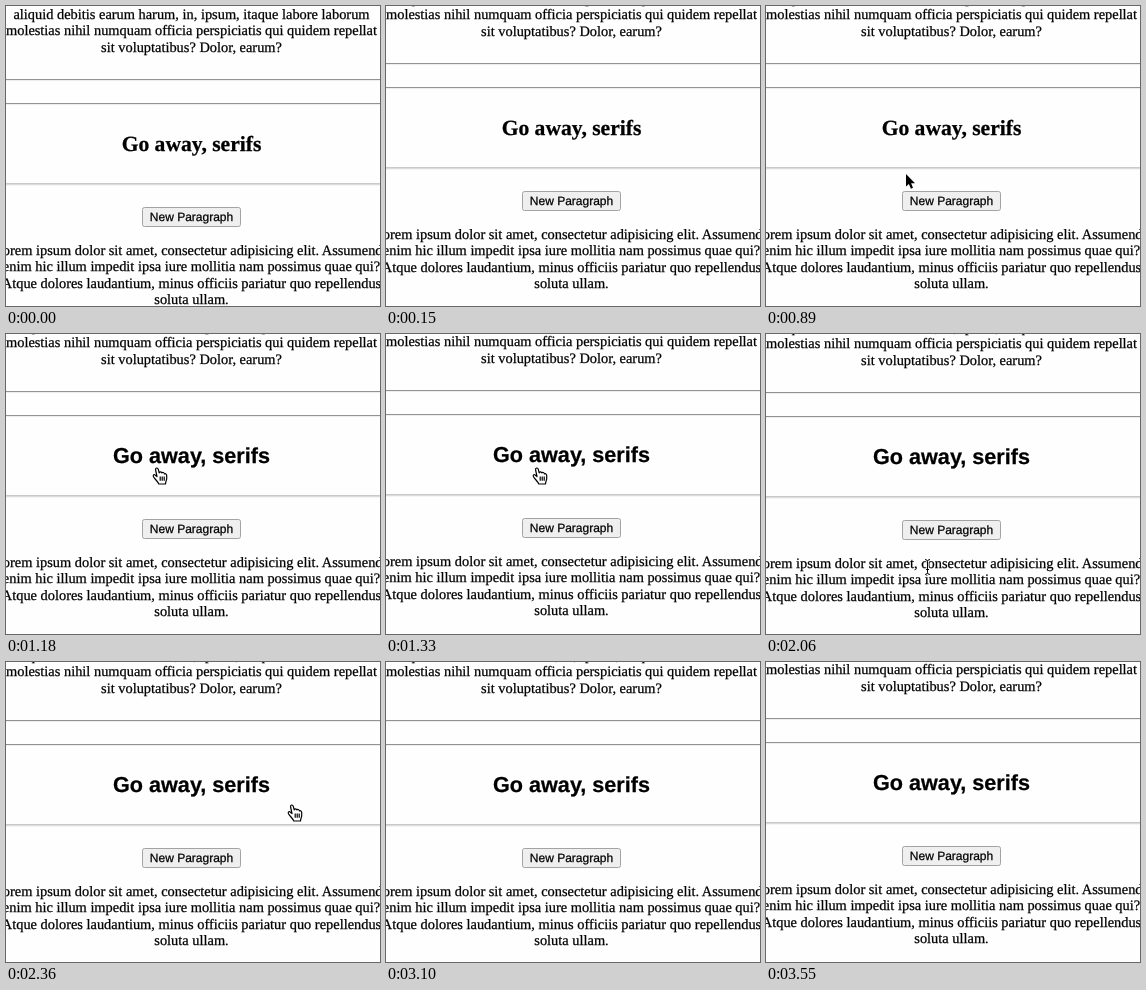
An HTML page for the animation above (3650 ms loop, 374 by 300 pixels).

```html
<!DOCTYPE html>
<html lang="en">
<head>
<meta charset="utf-8">
<title>Go away, serifs</title>
<style>
  html, body { margin: 0; width: 100%; height: 100%; overflow: hidden; background: #fefefe; }
  svg { display: block; width: 374px; height: 300px; }
  text { font: 14.4px "Liberation Serif", Times, serif; text-anchor: middle; text-rendering: geometricPrecision; stroke: #000; stroke-width: .25px; }
  #title { font-size: 21.6px; font-weight: bold; }
  #title.sans, #label { font-family: "Liberation Sans", Arial, sans-serif; }
  #label { font-size: 12px; }
  #pointer > * { visibility: hidden; }
  #pointer > .on { visibility: visible; }
</style>
</head>
<body>
<svg viewBox="0 0 374 300">
  <defs>
    <path id="stem" fill="none" d="M1 .5Q3.5 .5 3.5 2.5V13.5Q3.5 15.5 1 15.5M6 .5Q3.5 .5 3.5 2.5M3.5 13.5Q3.5 15.5 6 15.5M2 10.5H5"/>
  </defs>
  <g id="page">
    <text x="185.5" y="13">aliquid debitis earum harum, in, ipsum, itaque labore laborum</text>
    <text x="185.5" y="29">molestias nihil numquam officia perspiciatis qui quidem repellat</text>
    <text x="185.5" y="46">sit voluptatibus? Dolor, earum?</text>
    <path d="M0 73.5H374M0 97.5H374M0 178H374" stroke="#929292"/>
    <path d="M0 74.5H374M0 98.5H374M0 179H374" stroke="#eee"/>
    <text id="title" x="185.5" y="145">Go away, serifs</text>
    <rect x="136.5" y="201.5" width="98" height="19" rx="2" fill="#efefef" stroke="#a3a3a3"/>
    <text id="label" x="185.5" y="215">New Paragraph</text>
    <text x="185.5" y="249">Lorem ipsum dolor sit amet, consectetur adipisicing elit. Assumenda</text>
    <text x="185.5" y="265">enim hic illum impedit ipsa iure mollitia nam possimus quae qui?</text>
    <text x="185.5" y="282">Atque dolores laudantium, minus officiis pariatur quo repellendus</text>
    <text x="185.5" y="298">soluta ullam.</text>
  </g>
  <g id="pointer">
    <path id="arrow" d="M2 1V13.6L4.9 11 6.9 15.7 9 14.8 7.1 10.2H11Z" stroke="#fff" stroke-width="2" paint-order="stroke"/>
    <g id="beam">
      <use href="#stem" stroke="#fff" stroke-width="2.4"/>
      <use href="#stem" stroke="#000"/>
    </g>
    <path id="hand" fill="#fff" stroke="#000" stroke-width="1.2" stroke-linejoin="round" d="M5 9.5 3.6 3C3.2 .7 5.7 .3 6.3 2.3L7.2 5.8C7.6 4.4 9.5 4.5 9.8 6 10.5 5 12.2 5.4 12.4 6.9 13.4 6.3 14.7 7 14.7 8.6V11.5C14.7 13.2 13.7 14.2 13.5 17H6.8C5.8 14.5 3.2 12.4 1.6 10 .5 8.2 2 6.8 3.4 8.2ZM8.2 9.5V13.8M10.2 9.5V13.8M12.2 9.5V13.8"/>
  </g>
</svg>
<script>
const LOOP = 3650;
const $ = id => document.getElementById(id);

// [start ms, page offset]
const scroll = [[0, 0], [150, -16], [1330, -17], [2060, -15], [3550, -17]];

// [start ms, cursor, left, top]
const moves = [
  [0, '', 0, 0],
  [590, 'beam', 142, 296], [740, 'beam', 137, 206],
  [890, 'arrow', 138, 167],
  [1040, 'hand', 139, 147], [1180, 'hand', 146, 133], [1470, 'hand', 144, 139],
  [1620, 'beam', 158, 217], [1770, 'beam', 157, 224], [1920, 'beam', 158, 224], [2060, 'beam', 158, 225],
  [2210, 'arrow', 230, 209],
  [2360, 'hand', 281, 142], [2510, 'hand', 260, 126], [2660, 'hand', 235, 118],
  [2800, 'hand', 231, 117], [2950, 'hand', 258, 171],
  [3100, '', 0, 0]
];

const current = (steps, t) => steps.findLast(step => step[0] <= t);

function draw(now) {
  const t = now % LOOP;
  const [, cursor, x, y] = current(moves, t);
  $('page').setAttribute('transform', `translate(0 ${current(scroll, t)[1]})`);
  $('title').classList.toggle('sans', t >= 1040);
  $('pointer').setAttribute('transform', `translate(${x} ${y})`);
  for (const id of ['arrow', 'beam', 'hand']) $(id).classList.toggle('on', id === cursor);
  requestAnimationFrame(draw);
}
draw(performance.now());
</script>
</body>
</html>
```
